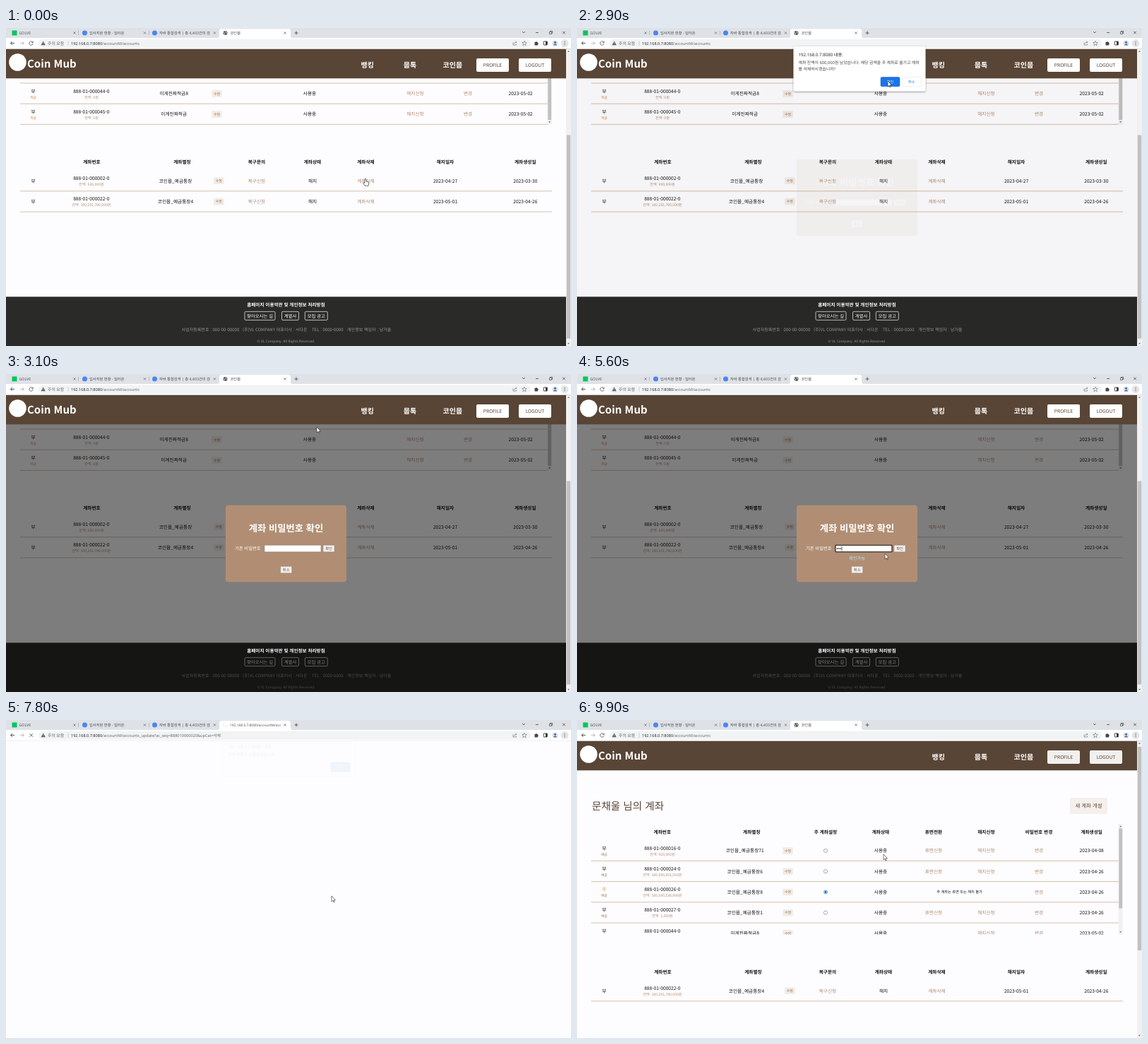
Write an HTML page that moves like this. It is 800x450 px and loops after 10000 ms.

```html
<!DOCTYPE html>
<html lang="ko">
<head>
<meta charset="utf-8">
<title>코인뭅</title>
<style>
html,body{margin:0;width:100%;height:100%;overflow:hidden;background:#fdfcfe}
svg{display:block;width:800px;height:450px}
text{font-family:'Noto Sans CJK KR','Noto Sans CJK','Noto Sans',sans-serif;text-anchor:middle;text-rendering:geometricPrecision;white-space:pre}
.l{text-anchor:start}
.u{font-family:'Open Sans','Noto Sans CJK KR',sans-serif}
.b{font-weight:700}
</style>
</head>
<body>
<svg id="stage" viewBox="0 0 800 450"></svg>
<script>
const LOOP = 10000, STEP = 100;
const BROWN = '#594535', TAN = '#b18e73', INK = '#151515', GREY = '#5f6368', PAGE = '#fdfcfe';

// Text is placed by its vertical centre.
const text = (x, y, s, size = 6.67, fill = INK, cls = '') =>
  `<text x="${x}" y="${y + size * .36}" font-size="${size}" fill="${fill}" class="${cls}">${s}</text>`;
const rect = (x, y, w, h, fill, r = 0, more = '') =>
  `<rect x="${x}" y="${y}" width="${w}" height="${h}" rx="${r}" fill="${fill}" ${more}/>`;
const path = (d, stroke = GREY, w = .8, fill = 'none') =>
  `<path d="${d}" stroke="${stroke}" stroke-width="${w}" fill="${fill}"/>`;
const dot = (x, y, r, fill, more = '') => `<circle cx="${x}" cy="${y}" r="${r}" fill="${fill}" ${more}/>`;
const group = (id, body) => `<g id="${id}">${body}</g>`;
const cross = (x, y, r, c, w) => path(`M${x - r} ${y - r}l${2 * r} ${2 * r}m0 ${-2 * r}l${-2 * r} ${2 * r}`, c, w);
const rule = (y, x2) => path(`M20 ${y}H${x2}`, '#cab29b', .8);
const heads = (y, cols) => cols.map(([x, s]) => text(x, y, s, 6.67, INK, 'b')).join('');

function browser() {
  const tab = (x, color, round, s) =>
    rect(x, 3.5, 7, 7, color, round) + text(x + 10, 7, s, 5.3, '#45494d', 'l u') + cross(x + 88.5, 7, 1.6, GREY, .7);
  return rect(0, 0, 800, 14, '#dee1e6') + rect(0, 14, 800, 15.3, '#fff') +
    path('M299 14Q302 14 302 11V3.5Q302 1 305 1H400Q403 1 403 3.5V11Q403 14 406 14Z', 'none', 0, '#fff') +
    path('M0 29.3H800', '#dcdfe3', .5) +
    tab(8.5, '#03c75a', .5, 'GOLVE') + tab(108, '#4a86f0', 3.5, '입사지원 현황 - 일터온') +
    tab(207, '#4a86f0', 3.5, '자바 통합검색 | 총 4,403건의 검') +
    path('M102.5 4V10M202.5 4V10', '#8d9196', .5) +
    cross(395, 7, 1.6, GREY, .7) + path('M408.5 7H413.5M411 4.5V9.5', '#444', .8) +
    path('M731 5L733 7 735 5M750 6.5H754', '#333', .7) +
    path('M769.5 5.5H772.5V8.5H769.5ZM770.5 5.5V4.3H773.7V7.5H772.5', '#333', .6) + cross(790, 6.5, 1.8, '#333', .7) +
    path('M12 21.5H6.5M9 19L6.5 21.5 9 24', '#4a4d51', .9) + path('M20 21.5H25.5M23 19L25.5 21.5 23 24', '#b6b8bb', .9) +
    rect(46, 15.7, 697, 12, '#f1f3f4', 6) +
    path('M52.7 18.5L55.8 24.2H49.6Z', 'none', 0, '#55585c') + path('M52.7 20.3V22.2M52.7 22.8V23.5', '#fff', .6) +
    text(59, 21.7, '주의 요함', 5.9, GREY, 'l u') + path('M88 18.5V25', '#a5a8ac', .5) +
    path('M718 20.5V24H722.5V22.5M719.5 22.5Q719.5 20 723 20M721.7 18.7L723 20 721.7 21.3', GREY, .6) +
    path('M734 18.3l1 2.2 2.3.2-1.8 1.6.6 2.4-2.1-1.3-2.1 1.3.6-2.4-1.8-1.6 2.3-.2Z', GREY, .6) +
    path('M748.5 20H750Q750.8 17.5 751.6 20H753V21.5Q755 22 753 23.2V24.5H748.5Z', 'none', 0, '#44474b') +
    rect(761.3, 19, 5, 5, 'none', .4, 'stroke="#333" stroke-width=".9"') + rect(764, 19, 2.3, 5, '#333') +
    dot(777.5, 21.6, 4.2, '#d3e0f5') + dot(777.5, 20.4, 1.4, '#41598a') + path('M774.8 24.2Q777.5 20.8 780.2 24.2Z', 'none', 0, '#41598a') +
    dot(791, 21.6, 5.5, '#e3e5e8') + [19.6, 21.6, 23.6].map(y => dot(791, y, .6, '#444')).join('') +
    group('idle',
      dot(310.5, 7, 3, '#55585c') + path('M308 6Q310 7 309.5 9.3M311 4.3Q310.5 6.5 313 7.5', '#fff', .8) +
      text(317.5, 7, '코인뭅', 5.3, '#45494d', 'l u') +
      path('M37.6 19.8A2.7 2.7 0 1 0 38.2 22M38.3 18.6V20.6H36.2', '#4a4d51', .8)) +
    group('busy',
      `<path id="spin" d="M310.5 4.2A2.8 2.8 0 1 1 307.7 7" fill="none" stroke-width=".9"/>` +
      text(317, 7, '192.168.0.7:8080/accountM/acc', 4.9, '#45494d', 'l u') + cross(35.7, 21.5, 2.2, '#4a4d51', .9)) +
    `<text x="92" y="23.6" font-size="5.57" fill="#202124" class="l u">192.168.0.7:8080<tspan id="url" fill="${GREY}"></tspan></text>`;
}

function header() {
  const button = (x, s) => rect(x, 43, 46, 19, '#fff', 2, 'class="pill"') + text(x + 23, 53, s, 6.67, BROWN);
  return rect(0, 29.5, 800, 41.8, BROWN) +
    group('brand', dot(16.5, 48.5, 12.3, '#fff') + text(30, 51, 'Coin Mub', 15, '#fff', 'l b')) +
    group('menu', text(511.8, 52, '뱅킹', 10, '#fff', 'b') + text(572, 52, '뭅톡', 10, '#fff', 'b') +
      text(632.3, 52, '코인뭅', 10, '#fff', 'b') + button(666, 'PROFILE') + button(726, 'LOGOUT'));
}

const chip = (x, y) => rect(x - 7.3, y - 4.7, 14.6, 9.6, '#f3ece5', 1.2) + text(x, y, '수정', 5, '#8a6b50');
const account = (y, no, sum) =>
  text(120.8, y - 3.7, `888-01-${no}-0`) + text(121, y + 5, `잔액: ${sum}원`, 5.1, TAN);

function openRow(y, [no, sum, alias, day, kind, mode]) {
  const main = mode === 'main', saving = kind === '적금';
  let s = text(38.5, y - 3.7, main ? '주' : '부', 6.67, main ? '#e0902a' : INK) +
    text(38.5, y + 5.2, kind, 4.7, saving ? '#e07a20' : '#9a7357') + account(y, no, sum) +
    text(237.7, y, alias) + chip(298.5, y) + text(430, y, '사용중') + text(654, y, '변경', 6.67, TAN) +
    text(728.7, y, day) + rule(y + 14.4, 767);
  if (!saving) s += dot(352, y, 2.6, '#fff', `stroke="${main ? '#0b72e7' : '#767676'}" stroke-width=".6"`);
  if (main) s += dot(352, y, 1.6, '#0b72e7') + text(541.5, y, '주 계좌는 휴면 또는 해지 불가', 5.2);
  else s += text(579.5, y, '해지신청', 6.67, TAN) + (saving ? '' : text(505, y, '휴면신청', 6.67, TAN));
  return s;
}

const closedRow = (y, [no, sum, alias, closed, made]) =>
  text(38.5, y, '부') + account(y, no, sum) + text(240, y, alias) + chip(301.3, y) +
  text(355, y, '복구신청', 6.67, TAN) + text(434, y, '해지') + text(509.5, y, '계좌삭제', 6.67, TAN) +
  text(622, y, closed) + text(735.3, y, made) + rule(y + 14.6, 773);

const closedTable = (y, rows) =>
  heads(y, [[121.5, '계좌번호'], [249.5, '계좌별칭'], [355, '복구문의'], [434, '계좌상태'], [509.5, '계좌삭제'], [622, '해지일자'], [735.3, '계좌생성일']]) +
  rows.map((r, i) => closedRow(y + 26.2 + i * 29.3, r)).join('');

const arrowMark = (x, y, dir) => path(`M${x - 1.5} ${y - dir * .8}h3L${x} ${y + dir}Z`, 'none', 0, '#666');
const pageBar = y => rect(793, 29.5, 7, 421, '#f1f1f1') + rect(793.8, y, 5.4, 288, '#c1c1c1') +
  arrowMark(796.5, 33, -1) + arrowMark(796.5, 446.5, 1);
const listBar = (top, bottom, y, h) => rect(766.7, top, 6, bottom - top, '#f1f1f1') +
  rect(767.3, y, 4.8, h, '#c1c1c1') + arrowMark(769.7, bottom - 3.5, 1);

const savings = [
  ['000044', '0', '이게진짜적금8', '2023-05-02', '적금'],
  ['000045', '0', '이게진짜적금', '2023-05-02', '적금']];
const deposits = [
  ['000016', '410,000', '코인뭅_예금통장71', '2023-04-08', '예금'],
  ['000024', '100,000,091,503', '코인뭅_예금통장6', '2023-04-26', '예금'],
  ['000026', '500,000,538,898', '코인뭅_예금통장8', '2023-04-26', '예금', 'main'],
  ['000027', '1,000', '코인뭅_예금통장1', '2023-04-26', '예금'], savings[0]];
const closed = [
  ['000002', '600,000', '코인뭅_예금통장', '2023-04-27', '2023-03-30'],
  ['000022', '100,291,780,000', '코인뭅_예금통장4', '2023-05-01', '2023-04-26']];

function footer() {
  const link = (x, w, s) => rect(x, 401.3, w, 12, 'none', 1.5, 'stroke="#fff" stroke-width=".7"') +
    text(x + w / 2, 407.2, s, 6.4, '#fff');
  const note = (x, s) => text(x, 427, s, 6.05, '#969696', 'l');
  return rect(0, 380.3, 793, 70, '#2a2a29') + link(338, 43, '찾아오시는 길') + link(390.5, 24, '계열사') + link(423.3, 32, '모집 공고') +
    note(248.5, '사업자등록번호 : 000-00-00000') + note(335, '(주)VL COMPANY 대표이사 : 서다온') +
    note(433, 'TEL : 0000-0000') + note(483, '개인정보 책임자 : 남가율') +
    text(396.5, 443, '© VL Company. All Rights Reserved.', 4.9, '#969696');
}

function modal() {
  const button = (x, y, s) => rect(x, y, 16, 9.6, '#f1efee', .8, 'stroke="#8b6f5a" stroke-width=".4"') + text(x + 8, y + 4.8, s, 5.3, '#6b5341');
  return rect(311, 185.7, 171, 108.6, TAN, 4) + text(396.5, 218, '계좌 비밀번호 확인', 13.3, '#fff', 'b') +
    text(324, 247, '기존 비밀번호', 6.3, '#fff', 'l') +
    rect(366, 242.2, 80, 9.6, '#fff', .5, 'id="field"') +
    [0, 1, 2, 3].map(i => dot(368.3 + i * 1.75, 247, .8, '#222', 'class="key"')).join('') +
    rect(374.7, 243.5, .6, 7, '#000', 0, 'id="caret"') +
    group('valid', text(396.5, 261, '확인가능', 6.3, '#b5e6fa')) +
    button(449, 242.2, '확인') + button(388.7, 272.2, '취소');
}

function dialog(h, lines, buttons) {
  return rect(306.5, 26, 187, h, '#fff', 2, 'filter="url(#shadow)"') +
    text(313.5, 37.5, '192.168.0.7:8080 내용:', 6.15, '#202124', 'l u') +
    lines.map((s, i) => text(313.5, 49.3 + i * 8.6, s, 5.85, '#3c4043', 'l u')).join('') +
    buttons.map(([x, s, main]) => rect(x, h + 6, 27, 13.3, main ? '#1a73e8' : '#fff', 1.7, `stroke="${main ? '#1765cc' : '#dadce0'}" stroke-width=".5"`) +
      text(x + 13.5, h + 12.6, s, 5.2, main ? '#fff' : '#1a73e8', 'u')).join('');
}

const stage = document.getElementById('stage');
stage.innerHTML =
  `<defs><filter id="shadow" x="-10%" y="-20%" width="120%" height="150%"><feDropShadow dx="0" dy=".8" stdDeviation="1.2" flood-opacity=".5"/></filter>
  <clipPath id="upper"><rect x="0" y="71" width="793" height="66"/></clipPath><clipPath id="list"><rect x="0" y="146" width="793" height="157.5"/></clipPath></defs>` +
  rect(0, 0, 800, 450, PAGE) +
  group('before',
    `<g clip-path="url(#upper)">${rule(78, 767)}${savings.map((r, i) => openRow(92.8 + i * 29.2, r)).join('')}</g>` +
    listBar(71, 136.5, 71, 59) + closedTable(190, closed) + footer() +
    group('shade', rect(0, 71, 793, 379, '#000', 0, 'opacity=".5"')) +
    text(396.5, 391.3, '홈페이지 이용약관 및 개인정보 처리방침', 6.6, '#fff', 'b') +
    group('modal', modal())) +
  group('after',
    text(21, 122, '문채울 님의 계좌', 14.6, BROWN, 'l') + rect(698, 110, 53, 23, '#f5f0eb', 2) + text(724.5, 121.8, '새 계좌 개설', 7.4, BROWN) +
    heads(159, [[120.8, '계좌번호'], [247.3, '계좌별칭'], [352, '주 계좌설정'], [430, '계좌상태'], [505, '휴면전환'], [579.5, '해지신청'], [654, '비밀번호 변경'], [728.7, '계좌생성일']]) +
    `<g clip-path="url(#list)">${deposits.map((r, i) => openRow(185 + i * 29.2, r)).join('')}</g>` +
    listBar(147, 303.5, 153.5, 113) + arrowMark(769.7, 150.5, -1) + closedTable(357, closed.slice(1))) +
  group('header', header()) + group('barLow', pageBar(151.5)) + group('barTop', pageBar(38)) + browser() +
  group('ask', dialog(63.5, ['계좌 잔액이 600,000원 남았습니다. 해당 금액을 주 계좌로 옮기고 계좌', '를 삭제하시겠습니까?'], [[430, '확인', 1], [460.3, '취소']])) +
  group('done', dialog(54, ['계좌 삭제가 완료되었습니다'], [[460, '확인', 1]])) +
  group('pointer',
    group('arrow', path('M0 0V8L1.9 6.3 3.1 9 4.2 8.5 3 5.9H5.5Z', '#111', .55, '#fff')) +
    group('hand', path('M-1 .8Q0-.5 1 .8V4L4 4.8Q5 5.2 4.7 6.5L4 10.3H-1L-3.5 6.7Q-3.5 5.3-1 6.3Z', '#111', .6, '#fff')));

const el = Object.fromEntries([...stage.querySelectorAll('[id]')].map(n => [n.id, n]));
const keys = stage.querySelectorAll('.key'), pills = stage.querySelectorAll('.pill');

// Step tables: [time, value]; the pointer table is [time, x, y].
const askFade = [[0, 0], [400, .1], [500, 1], [3000, 0]];
const modalFade = [[0, 0], [2800, .02], [2900, .06], [3000, .6], [3100, 1]];
const doneFade = [[0, 0], [7800, .05], [7900, 1], [9600, .3], [9700, 0]];
const keyTimes = [4800, 5000, 5300, 5500];
const route = [[0, 509, 213], [800, 509, 213], [1100, 482, 160], [1400, 447, 85], [1800, 440, 75], [3100, 440, 75],
  [3800, 449, 232], [4100, 447, 252], [4500, 437, 246], [4700, 437, 246], [5100, 438, 266], [5500, 436, 254], [5600, 436, 254],
  [5700, 457, 251], [5900, 460, 249], [6500, 460, 249], [6600, 461, 249], [8000, 461, 249], [8700, 465, 150], [9200, 466, 74],
  [9500, 466, 71], [9600, 464, 82], [9900, 434, 190]];

const held = (table, t) => table.findLast(k => k[0] <= t)[1];
function along(t) {
  const i = route.findLastIndex(k => k[0] <= t), a = route[i], b = route[i + 1] || a;
  const p = b === a ? 0 : (t - a[0]) / (b[0] - a[0]);
  return [a[1] + (b[1] - a[1]) * p, a[2] + (b[2] - a[2]) * p];
}
const show = (node, on) => node.style.display = on ? '' : 'none';
const fade = (node, v) => { show(node, v > 0); node.style.opacity = v; };

function draw(t) {
  const left = t >= 7600, loaded = t >= 9600, busy = left && t < 9700;
  show(el.before, !left); show(el.barLow, !left);
  show(el.after, loaded); show(el.barTop, loaded);
  show(el.header, !left || t >= 9500);
  show(el.brand, !left || t >= 9700);
  el.menu.setAttribute('transform', `translate(${left && !loaded ? 7 : 0})`);
  pills.forEach(p => p.setAttribute('fill', loaded ? '#f2f0ef' : '#fff'));

  show(el.idle, !busy); show(el.busy, busy);
  el.spin.setAttribute('stroke', t < 9400 ? '#eceef0' : '#2b7de9');
  el.spin.setAttribute('transform', `rotate(${(t - 9500) * (t < 9400 ? -.25 : .5)} 310.5 7)`);
  el.url.textContent = '/accountM/accounts' + (left && t < 9400 ? '_update?ac_seq=888010000020&upCat=삭제' : '');

  fade(el.ask, held(askFade, t)); fade(el.done, held(doneFade, t));
  fade(el.shade, held(modalFade, t)); fade(el.modal, held(modalFade, t));
  const focus = t >= 4500;
  el.field.setAttribute('stroke', focus ? '#111' : '#777');
  el.field.setAttribute('stroke-width', focus ? 1.1 : .5);
  const typed = keyTimes.filter(k => k <= t).length;
  keys.forEach((k, i) => show(k, i < typed));
  el.caret.setAttribute('x', 367.7 + typed * 1.75);
  show(el.caret, focus && !(t >= 6100 && t < 6600) && t < 7200);
  show(el.valid, typed === 4);

  const [x, y] = along(t);
  el.pointer.setAttribute('transform', `translate(${x} ${y})`);
  show(el.hand, t < 500); show(el.arrow, t >= 500);
}

const start = performance.now();
function tick() {
  const t = (performance.now() - start) % LOOP;
  draw(Math.floor(t / STEP) * STEP);
  requestAnimationFrame(tick);
}
draw(0);
requestAnimationFrame(tick);
</script>
</body>
</html>
```
